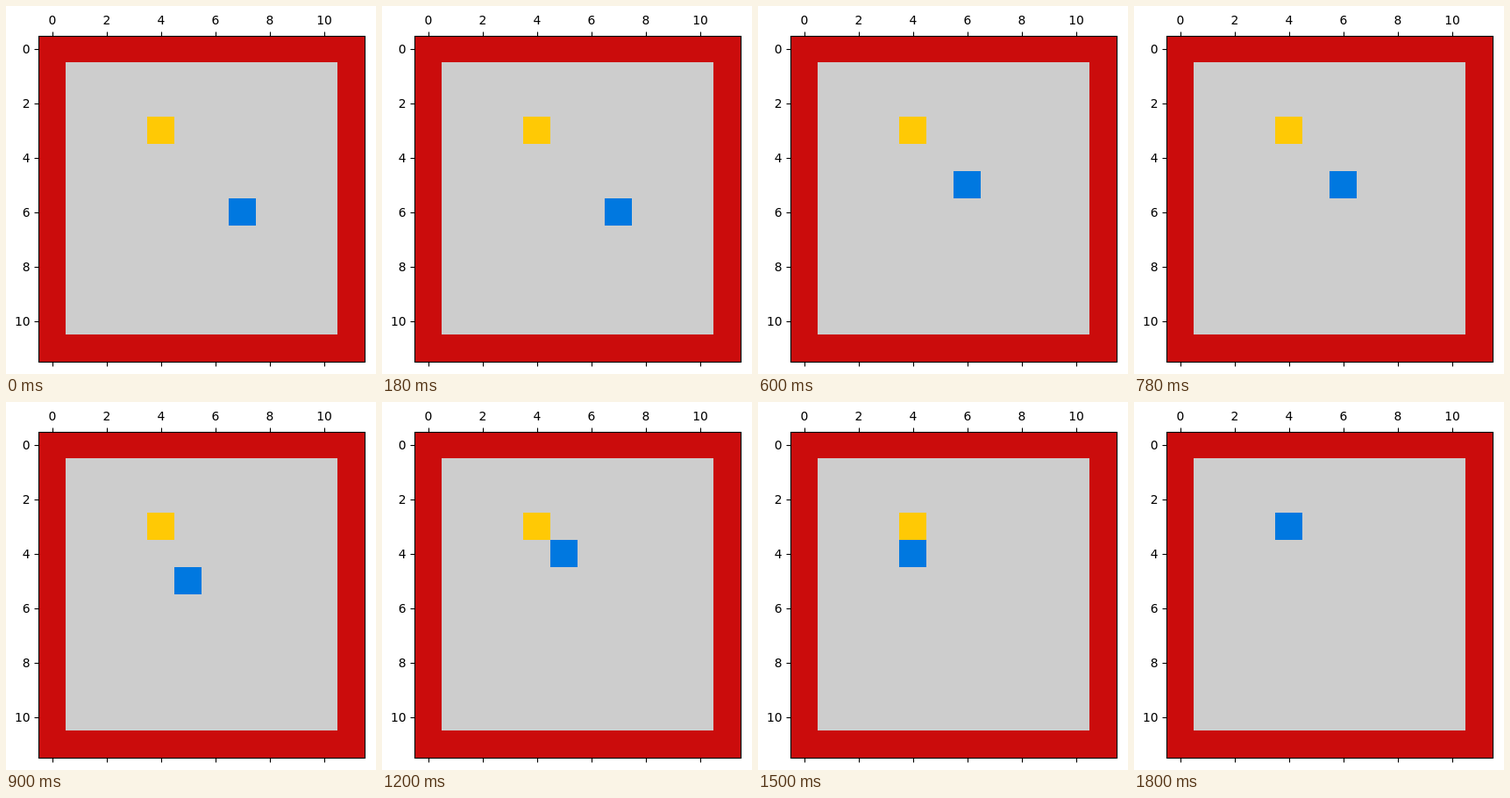
Recreate the animation shown at these times as an HTML page with a canvas. Size 422x419 px, loop 2100 ms.

```html
<!DOCTYPE html>
<html lang="en">
<head>
<meta charset="utf-8">
<title>Grid walk</title>
<style>
  html, body { margin: 0; width: 100%; height: 100%; overflow: hidden; background: #fff; }
  canvas { display: block; }
</style>
</head>
<body>
<canvas id="stage" width="422" height="419"></canvas>
<script>
const ctx = document.getElementById('stage').getContext('2d');
const LEFT = 37, TOP = 33, CELL = 31, COUNT = 12;
const STEP_MS = 300, STEPS = 7;
const RED = '#cb0c0c', GREY = '#cdcdcd', YELLOW = '#ffc905', BLUE = '#0078e0';

function cells(col, row, size, color) {
  ctx.fillStyle = color;
  ctx.fillRect(LEFT + col * CELL, TOP + row * CELL, size * CELL, size * CELL);
}

function line(x1, y1, x2, y2) {
  ctx.beginPath();
  ctx.moveTo(x1, y1);
  ctx.lineTo(x2, y2);
  ctx.stroke();
}

function label(text, x, y, align) {
  ctx.textAlign = align;
  ctx.fillText(text, x, y);
}

function drawAxes() {
  ctx.strokeStyle = ctx.fillStyle = '#000';
  ctx.lineWidth = 1.11;
  ctx.font = '13.89px "DejaVu Sans", sans-serif';
  ctx.strokeRect(37.5, 34.5, 372, 371);
  for (let n = 0; n < COUNT; n += 2) {
    const x = 53.5 + n * CELL, y = 49.5 + n * CELL;
    line(x, 29.5, x, 34.5);
    line(x, 405.5, x, 410.5);
    line(32.5, y, 37.5, y);
    label(n, x - 0.5, 21, 'center');
    label(n, 27.7, y + 4.5, 'right');
  }
}

function draw(step) {
  ctx.fillStyle = '#fff';
  ctx.fillRect(0, 0, 422, 419);

  ctx.save();
  ctx.beginPath();
  ctx.rect(37, 34, 373, 372);
  ctx.clip();
  cells(0, 0, COUNT, RED);
  cells(1, 1, COUNT - 2, GREY);
  cells(4, 3, 1, YELLOW);
  // The walker alternates one cell left, one cell up.
  cells(7 - Math.ceil(step / 2), 6 - Math.floor(step / 2), 1, BLUE);
  ctx.restore();

  drawAxes();
}

const start = performance.now();
function tick() {
  draw(Math.floor((performance.now() - start) / STEP_MS) % STEPS);
  requestAnimationFrame(tick);
}
tick();
</script>
</body>
</html>
```
